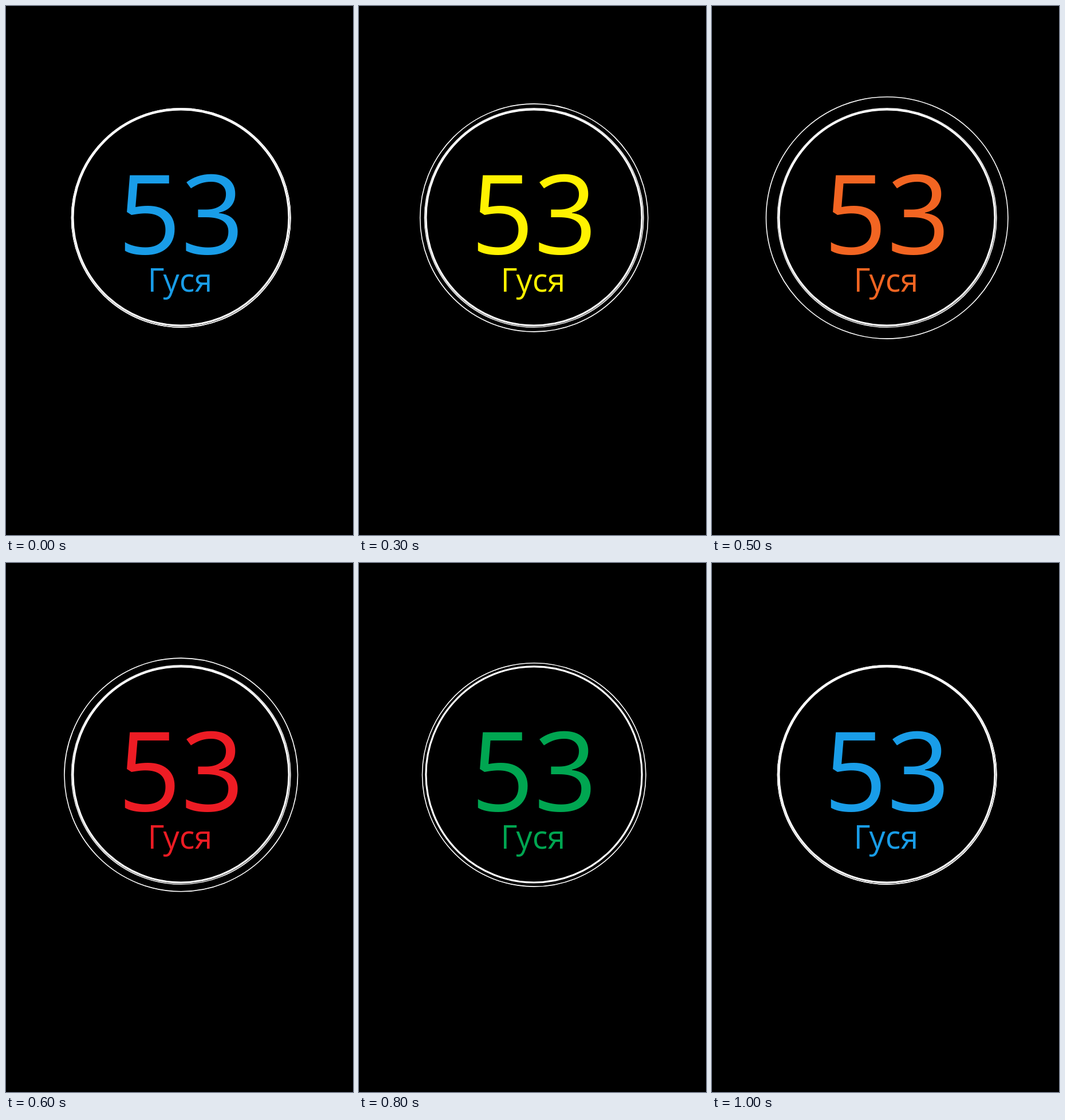
Recreate the animation shown at these times as an HTML page. Size 606 px wide and 924 px high, loop 1.1 s.

```html
<!DOCTYPE html>
<html lang="ru">
<head>
<meta charset="utf-8">
<style>
  html, body { margin: 0; width: 100%; height: 100%; overflow: hidden; background: #000; }
  svg { display: block; width: 606px; height: 924px; }
  circle { fill: none; stroke: #fff; }
  text { font-family: "Open Sans", "Noto Sans", sans-serif; text-anchor: middle; }
</style>
</head>
<body>
<svg viewBox="0 0 606 924">
  <circle cx="305.5" cy="369.4" r="188.6" stroke-width="3.2"/>
  <circle id="rim" cx="305.7" cy="369.9" r="191.2" stroke-width="1.5"/>
  <circle id="wave" cx="305.7" cy="369.9" stroke-width="1.6"/>
  <g id="label">
    <text x="305.5" y="433" font-size="193">53</text>
    <text x="304" y="499" font-size="56">Гуся</text>
  </g>
</svg>
<script>
  const STEP = 100;
  // Outward half of the pulse: text colour, wave radius, rim shown
  const poses = [
    ["#199de8", 191.2, true],
    ["#00a99d", 193, false],
    ["#00a651", 195.2, false],
    ["#fff200", 199, true],
    ["#ed1c24", 203.8, true],
    ["#f26522", 211.2, true]
  ];
  const last = poses.length - 1;
  const count = 2 * last + 1;
  const [rim, wave, label] = ["rim", "wave", "label"].map(id => document.getElementById(id));
  const start = performance.now();

  function draw(now) {
    const step = Math.floor(Math.max(0, now - start) / STEP) % count;
    const [color, radius, hasRim] = poses[last - Math.abs(last - step)];
    label.setAttribute("fill", color);
    wave.setAttribute("r", radius);
    rim.setAttribute("visibility", hasRim ? "visible" : "hidden");
    requestAnimationFrame(draw);
  }
  draw(start);
</script>
</body>
</html>
```
